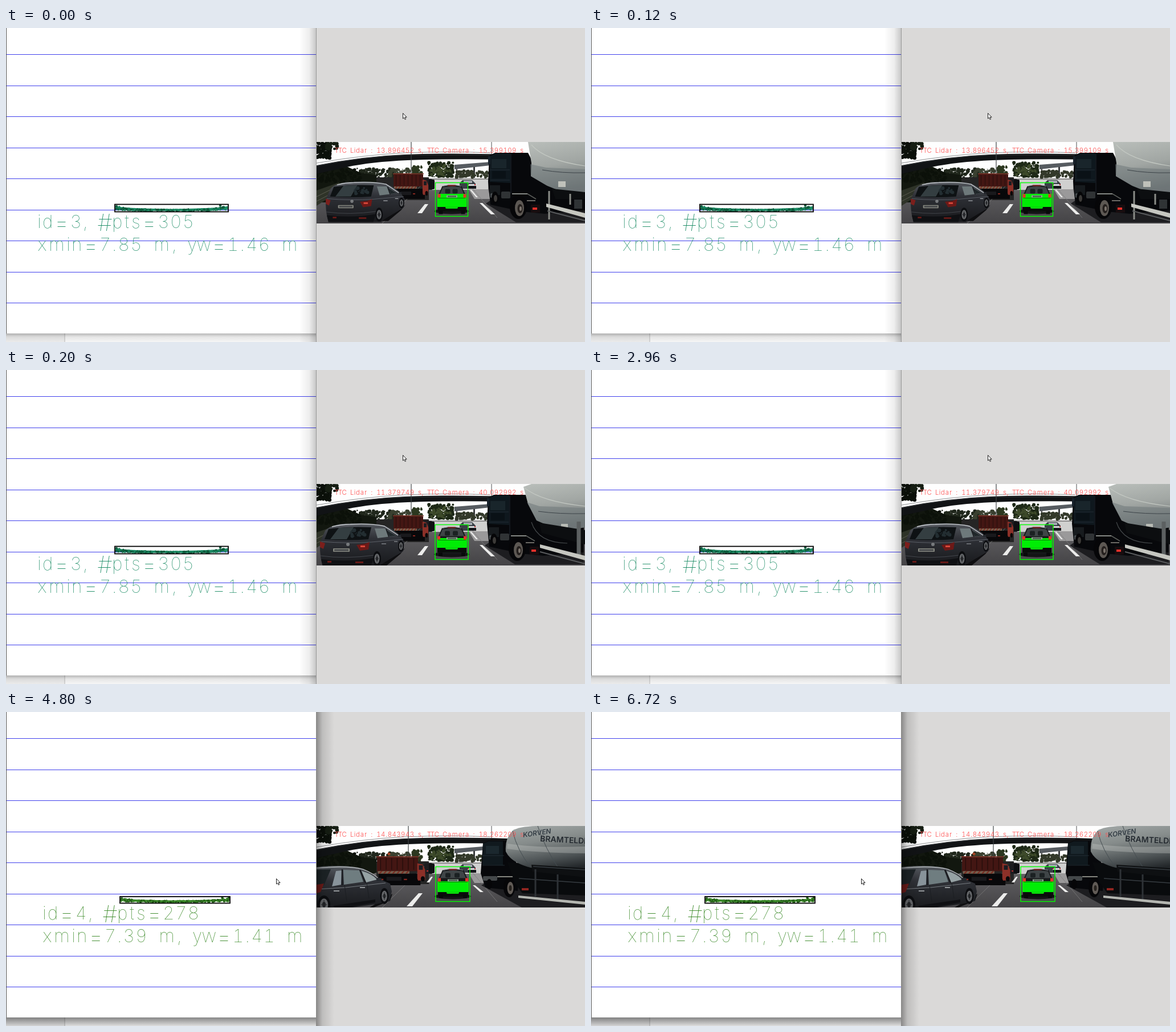
An HTML page that plays this animation: 1016 px wide and 551 px high, repeating every 8 s.

```html
<!DOCTYPE html>
<html lang="en">
<head>
<meta charset="utf-8">
<title>Time to collision</title>
<style>
html, body { margin: 0; width: 100%; height: 100%; overflow: hidden; background: #dad9d8; }
#stage { display: block; width: 1016px; height: 551px; }
text { font-family: Inter, Lato, "Open Sans", sans-serif; font-variant-numeric: tabular-nums; white-space: pre; }
.big text { font-weight: 100; }
.small text { font-weight: 300; }
.wide { font-size: 1.3em; }
.sign { font-weight: 600; }
.show { animation: 8s step-end infinite; }
#early { animation-name: early; }
#late { animation-name: late; }
#first { animation-name: first; }
#second { animation-name: second; }
@keyframes early { 0% { visibility: visible } 60%, 100% { visibility: hidden } }
@keyframes late { 0% { visibility: hidden } 60%, 100% { visibility: visible } }
@keyframes first { 0% { visibility: visible } 2.5%, 100% { visibility: hidden } }
@keyframes second { 0% { visibility: hidden } 2.5% { visibility: visible } 60%, 100% { visibility: hidden } }
</style>
</head>
<body>
<svg id="stage" viewBox="0 0 1016 551" xmlns="http://www.w3.org/2000/svg">
  <defs>
    <linearGradient id="sideIn" x1="1" x2="0"><stop offset="0" stop-opacity=".22"/><stop offset=".4" stop-opacity=".07"/><stop offset="1" stop-opacity="0"/></linearGradient>
    <linearGradient id="sideOut"><stop offset="0" stop-opacity=".38"/><stop offset=".35" stop-opacity=".13"/><stop offset="1" stop-opacity="0"/></linearGradient>
    <linearGradient id="under" x2="0" y2="1"><stop offset="0" stop-opacity=".25"/><stop offset=".4" stop-opacity=".07"/><stop offset="1" stop-opacity="0"/></linearGradient>
    <linearGradient id="underDark" x2="0" y2="1"><stop offset="0" stop-opacity=".45"/><stop offset="1" stop-opacity=".1"/></linearGradient>
    <linearGradient id="road" x2="0" y2="1"><stop offset="0" stop-color="#8b8a8a"/><stop offset=".3" stop-color="#5f5e60"/><stop offset="1" stop-color="#444346"/></linearGradient>
    <linearGradient id="paint" x2="0" y2="1"><stop offset="0" stop-color="#565a60"/><stop offset=".35" stop-color="#2f3137"/><stop offset="1" stop-color="#17181b"/></linearGradient>
    <linearGradient id="steel" x2=".25" y2="1"><stop offset="0" stop-color="#a4aaa9"/><stop offset=".4" stop-color="#858b8a"/><stop offset=".75" stop-color="#4e5456"/><stop offset="1" stop-color="#23272a"/></linearGradient>
    <linearGradient id="shell" x2=".2" y2="1"><stop offset="0" stop-color="#b9beba"/><stop offset=".5" stop-color="#a1a6a3"/><stop offset="1" stop-color="#6c7273"/></linearGradient>
  </defs>
  <g id="early" class="show"></g>
  <g id="late" class="show"></g>
</svg>
<script>
const box = (x, y, w, h, fill, more = '') => `<rect x="${x}" y="${y}" width="${w}" height="${h}" fill="${fill}" ${more}/>`;
const shape = (d, fill, more = '') => `<path d="${d}" fill="${fill}" ${more}/>`;
const line = (d, color, width = 1) => shape(d, 'none', `stroke="${color}" stroke-width="${width}"`);
const disc = (x, y, r, fill, ry = r) => `<ellipse cx="${x}" cy="${y}" rx="${r}" ry="${ry}" fill="${fill}"/>`;
const group = (inner, attrs) => `<g ${attrs}>${inner}</g>`;
const repeat = (n, fn) => Array.from({ length: n }, (_, i) => fn(i)).join('');

function seeded(seed) {
  return () => {
    seed = (seed * 1664525 + 1013904223) % 4294967296;
    return seed / 4294967296;
  };
}

// Plotter-style pitch: each glyph sits centred in a cell, in 21-per-cap-height units.
const cells = { '=': 26, '#': 21, '.': 10, ',': 10, ':': 10, ' ': 16, T: 16, C: 21, L: 17,
  a: 19, d: 19, e: 18, i: 8, m: 30, n: 19, p: 19, r: 13, s: 17, t: 12, w: 22, x: 17, y: 16 };

function label(str, x, y, scale, fill) {
  let pen = x;
  const xs = [], ys = [];
  for (const c of str) {
    const w = (cells[c] || 20) * scale;
    xs.push((pen + w / 2).toFixed(1));
    ys.push(y + ('=#'.includes(c) ? 4.5 * scale : 0));
    pen += w;
  }
  const marked = str.replace(/[=#]/g, '<tspan class="wide">$&</tspan>');
  return `<text x="${xs.join(' ')}" y="${ys.join(' ')}" font-size="${29 * scale}" text-anchor="middle" fill="${fill}">${marked}</text>`;
}

function leaves(x, y, w, h, n, fill, seed) {
  const rnd = seeded(seed);
  return repeat(n, () => disc((x + rnd() * w).toFixed(1), (y + rnd() * h).toFixed(1), (.8 + rnd() * 2.6).toFixed(1), fill));
}

function lidar(x, y, w, h, n, dark, light) {
  const rnd = seeded(n), r = x + w, base = y + h;
  const band = shape(`M${x + 1} ${y + 3}Q${x + 14} ${base - 6} ${x + w / 2} ${base - 5}Q${r - 14} ${base - 6} ${r - 1} ${y + 3}` +
    `V${base - 4}Q${x + w / 2} ${base + 1} ${x + 1} ${base - 4}Z`, light);
  const dots = repeat(n, () => {
    const u = rnd(), edge = Math.abs(2 * u - 1);
    const px = x + 2 + u * (w - 4);
    const py = base - 1 - 2 * edge * edge - rnd() * (3.5 + 5 * edge ** 8);
    return `<circle cx="${px.toFixed(1)}" cy="${py.toFixed(1)}" r="1.5" fill="${rnd() < .4 ? light : dark}"/>`;
  });
  return band + dots + disc(x + 3, y + 3, 2, dark) + disc(x + w * .93, y + 2, 2.2, dark) +
    box(x, y, w, h, 'none', 'stroke="#000" stroke-width="1.8"');
}

function topView(bounds, n, dark, light, ink, x, y, lines) {
  return box(0, 0, 544, 536, '#fff') +
    repeat(9, i => box(0, Math.round(46 + 54.5 * i), 544, 1, '#4040ec')) +
    lidar(...bounds, n, dark, light) +
    group(lines.map((s, i) => label(s, x, y + 40 * i, 1.09, ink)).join(''), 'class="big"') +
    box(0, 0, 1, 536, '#555');
}

const desk = shadow => box(0, 536, 544, 15, '#f6f6f6') + box(0, 536, 103, 15, '#ebebeb') +
  box(102, 536, 2, 15, '#d4d4d4') + box(0, 536, 544, 15, `url(#${shadow})`);

const cursor = (x, y) => shape(`M${x} ${y}v9.5l2.1-1.9 1.5 3.4 1.6-.7-1.5-3.3h2.9z`, '#fff', 'stroke="#222" stroke-width="1"');

function backdrop(pole) {
  return box(545, 200, 471, 143, '#fefefe') +
    box(545, 264, 471, 79, 'url(#road)') +
    leaves(620, 247, 60, 17, 120, '#20271c', 8) + leaves(672, 247, 36, 13, 60, '#3a4030', 5) +
    leaves(714, 242, 15, 20, 60, '#2c3820', 11) + leaves(741, 236, 44, 25, 170, '#1e2917', 4) +
    leaves(745, 240, 40, 20, 40, '#3d4a2a', 14) +
    shape('M545 250L598 243L622 254L650 258V282L572 306H545Z', '#12170f') +
    leaves(545, 246, 78, 24, 120, '#0c110a', 21) +
    shape('M545 285L585 271V286L545 312Z', '#2e3328') + line('M545 296L575 281M545 304L572 290', '#65655a', .8) +
    shape('M650 262H742V302H690L650 298Z', '#252525') +
    shape('M787 240L850 235V241L787 248Z', '#565b60') + box(790, 247, 2, 14, '#444') + box(820, 244, 3, 19, '#3a3c3e') +
    leaves(790, 251, 56, 11, 80, '#33392a', 19) +
    shape('M748 266H846V284H748Z', '#d0d0cf') + shape('M812 283H846L850 300H822Z', '#9a999a') +
    shape('M545 241Q625 225 700 222Q780 219 880 222V231Q780 229 705 232Q640 235 598 244L545 256Z', '#111315') +
    line('M545 237Q625 223 700 219Q780 216 850 219', '#707476', .8) + line('M545 242Q625 226 700 223L850 223', '#303437', 1) +
    leaves(545, 200, 24, 28, 130, '#0b100a', 2) + leaves(562, 201, 20, 12, 40, '#161e13', 6) +
    line(`M${pole} 200V255`, '#3f4346', 1.2) + line('M852 200V222', '#4c4e50', 1) +
    line('M735 270L660 343M812 274L862 333', '#7c7b7b', .8);
}

const distantCars = () => box(734, 265, 14, 19, '#1c1c1f', 'rx="2"') + box(742, 266, 10, 17, '#0e0f12', 'rx="2"') +
  box(738, 278, 3, 2, '#b43030') + shape('M796 282V272L801 267H818L824 273V282Z', '#3a4047') +
  box(803, 268, 15, 4, '#a6adb2') + box(810, 274, 15, 3, '#d8dadd') + box(811, 277, 14, 5, '#15161a') +
  box(810, 274, 2, 2, '#c03030') + box(822, 274, 2, 2, '#c03030');

const redTruck = () => box(682, 282, 53, 18, '#08080a') +
  shape('M680 255L732 257V278L680 279Z', '#431613') + box(679, 255, 54, 1.5, '#7a3227') +
  repeat(7, i => box(684 + 7 * i, 258, 1, 18, '#260e0c')) +
  box(681, 278, 40, 4, '#75604f') + repeat(7, i => shape(`M${682 + 5.6 * i} 282l3-4h2l-3 4z`, '#7a2a1f')) +
  shape('M731 266L738 268L741 276V292L731 293Z', '#8c3028') + box(733, 269, 5, 7, '#1c1d22') +
  box(684, 290, 4, 2, '#8a2820') + box(714, 290, 4, 2, '#8a2820') + box(692, 287, 19, 6, '#19191c') +
  disc(728, 294, 4, '#08080a', 6) + disc(738, 290, 2.5, '#08080a', 4);

const wheel = (x, y, r, ry) => disc(x, y, r, '#0c0d10', ry) + disc(x, y, r * .65, '#66686b', ry * .67) + disc(x, y, r * .28, '#222327', ry * .3) +
  line(`M${x - r * .5} ${y}h${r}M${x} ${y - ry * .5}v${ry}`, '#27282b', 1);

const greyCar = () => shape('M549 343L655 343L700 313L692 323L668 343Z', '#0e0e10') +
  shape('M551 302L560 282Q568 273 590 270Q640 267 664 273Q682 281 692 291L699 302L697 318L682 327L660 340L655 345H556Q550 326 551 302Z', 'url(#paint)') +
  shape('M566 279Q600 274 641 276L636 297Q600 300 559 297Z', '#0e1214') +
  shape('M584 277L610 276L598 297H569Z', '#343e41') + leaves(605, 280, 25, 13, 20, '#232e32', 9) +
  shape('M647 278L664 278L684 291L652 295Z', '#6e797b') + shape('M668 281L684 291L673 292Z', '#1f2629') + line('M667 279L672 293', '#1a1c20', 2) +
  line('M572 275Q588 271 604 271Q640 269 664 274L688 290', '#c8ccd0', 1.3) + line('M553 301Q600 305 641 302L697 297', '#5b5f66', 1) +
  shape('M551 301L560 304L557 314L551 311Z', '#7c1f1c') + shape('M638 302L629 305L615 307L621 317L636 315Z', '#6d1917') + box(622, 308, 8, 3, '#d9483a') +
  box(574, 313, 29, 6, '#85877f', 'rx="1"') + box(576, 314.5, 25, 3, '#45474a') + line('M552 326Q595 332 646 325', '#44474d') +
  shape('M553 332Q600 338 645 330L640 345H556Z', '#0f1013') + box(564, 335, 7, 3, '#661a17') + box(613, 336, 14, 3, '#661a17') +
  disc(600, 306, 3, '#777a7d') + box(688, 289, 5, 4, '#25282d', 'rx="1"') +
  line('M659 305H667M681 301H687', '#a6a9ad', 1.2) + wheel(651, 331, 7, 13) + wheel(693, 309, 5, 10);

const greyCarNear = () => shape('M545 343H638L678 319L674 331L645 343Z', '#0e0e10') +
  shape('M545 272Q598 267 627 275Q645 283 655 293L674 301L677 315L673 332L650 337L580 347H545Z', 'url(#paint)') +
  shape('M545 277L570 276L558 304L545 306Z', '#1d2427') +
  shape('M579 279L589 278L588 303L572 306Z', '#88939a') + shape('M592 277L620 278L627 298L593 303Z', '#6f7d80') +
  shape('M624 279Q643 284 651 294L632 299Z', '#96a2a4') + line('M590 276V304M621 277L631 300', '#1a1c20', 2.5) +
  line('M545 274Q600 269 626 276Q646 283 656 295', '#c3c7c9', 1.2) + line('M545 311L596 308L666 300', '#777c81', 1) +
  line('M594 304L598 333M633 300L637 327', '#1a1c20', .8) + line('M575 314H585M621 308H630', '#b7babd', 1.5) +
  box(650, 291, 9, 6, '#25292e', 'rx="2"') + shape('M545 303L558 301L552 316L545 318Z', '#701c19') +
  shape('M574 340L648 329V334L580 347Z', '#0f1013') + wheel(664, 323, 7.5, 14) + wheel(558, 338, 11, 16);

function target(x, y, w, h, fillY, fillH) {
  const mid = x + w / 2, r = x + w, foot = fillY + fillH;
  return disc(mid, y + h - 9, w / 2 + 2, '#131315', 5) +
    shape(`M${x + 4} ${y + 24}L${x + 12} ${y + 6}Q${mid} ${y + 2} ${r - 11} ${y + 6}L${r - 3} ${y + 24}V${y + 51}H${x + 4}Z`, '#17191b') +
    shape(`M${x + 13} ${y + 8}Q${mid} ${y + 5} ${r - 12} ${y + 8}L${r - 7} ${y + 20}H${x + 8}Z`, '#3f4547') +
    line(`M${x + 13} ${y + 6}Q${mid} ${y + 2} ${r - 12} ${y + 6}`, '#8a8f92', 1) +
    box(x + 17, y + 11, 9, 8, '#1b2122', 'rx="2"') + box(r - 27, y + 11, 9, 8, '#1b2122', 'rx="2"') +
    box(mid - 7, y + 4, 14, 2, '#7c2020') +
    box(x + 3, fillY, w - 5, fillH, '#00ed05', 'rx="1"') +
    box(x + 4, y + 20, 5, 6, '#e4322c') + box(r - 8, y + 20, 5, 6, '#e4322c') +
    box(mid - 9, y + 22, 19, 4, '#91a895') + box(mid - 7, y + 23, 15, 2, '#415445') +
    line(`M${x + 5} ${y + 27}H${r - 4}`, '#087e0b', 1) +
    box(x + 4, foot, w - 7, 8, '#0a0d0b') + box(mid - 11, foot - 1, 22, 4, '#08d90a', 'rx="2"') +
    box(x + 6, y + 49, 7, 6, '#08090a') + box(r - 12, y + 49, 7, 6, '#08090a') +
    box(x, y, w, h, 'none', 'stroke="#00ff00" stroke-width="1.4"');
}

const lorry = () => shape('M842 308L895 341H1016V282H880Z', '#1d1d20') +
  shape('M848 224L858 219H916L932 250L1016 262V320L945 326L905 322L850 310L846 270Z', '#07080b') +
  shape('M849 225L859 220H885V272L849 270Z', '#0f181e') + box(852, 230, 26, 16, '#19252b') +
  box(853, 251, 24, 13, '#0a1116') + line('M850 249H884M850 267H884M886 221V290', '#26323a', .8) +
  box(849, 276, 18, 17, '#171b1e') + box(850, 290, 12, 8, '#4b5053', 'rx="2"') + box(869, 287, 16, 12, '#303335', 'rx="2"') +
  box(846, 225, 4, 14, '#17212a') + line('M888 291H915', '#858884', 2) + line('M915 291L930 300', '#5b5d5a', 1.5) +
  disc(899, 314, 15, '#060608', 21) + disc(901, 316, 8, '#5d5853', 14) + disc(902, 317, 4.5, '#241f1d', 8) + disc(903, 317, 2, '#7a726b', 4) +
  disc(858, 298, 6, '#060608', 11) + disc(859, 299, 3, '#3c3a38', 6) +
  box(921, 310, 16, 14, '#180d0f') + box(924, 315, 8, 4, '#e4302a') + box(914, 302, 15, 2, '#6c6a65');

const tank = () => shape('M916 200H1016V292L975 287L950 277L921 260L922 237Z', 'url(#shell)') +
  shape('M920 239L948 245L1016 248V292L975 287L948 276L921 260Z', '#70787a', 'opacity=".55"') +
  line('M922 205Q945 232 1016 242', '#c3c8c2', 1.2) + line('M941 249Q975 255 1016 254', '#3c4348', 1) +
  box(969, 269, 13, 10, '#bfc1ba') + shape('M958 282L1016 288V300H964Z', '#0c0e10') +
  line('M953 286V336M990 291V310', '#8a8c87', 3) + shape('M948 308L1016 325V333L948 314Z', '#c6c7c1') +
  line('M950 321L1016 338', '#5a5c5e', 2) + box(997, 301, 14, 16, '#2f3335');

const tankLater = () => shape('M908 205L922 200H1016V276L994 280L956 275L931 264L916 235Z', 'url(#shell)') +
  shape('M914 232L936 239L1016 242V276L994 280L956 275L931 264Z', '#70787a', 'opacity=".55"') +
  line('M910 207Q940 231 1016 239', '#c3c8c2', 1.2) + line('M934 248Q970 253 1016 252', '#3c4348', 1) +
  box(974, 270, 12, 9, '#b8bbb5') + shape('M936 268L1016 281V306L940 286Z', '#0c0e10') +
  line('M922 267Q933 303 985 304', '#44484a', 1.2) + line('M1005 266V328', '#5c6061', 7) +
  shape('M937 306L1016 326V334L937 312Z', '#c6c7c1') + line('M937 319L1016 340', '#5a5c5e', 2);

const lorryNear = () => shape('M834 304L905 343H1016V283H870Z', '#1d1d20') +
  shape('M837 230L847 226H878L893 253L900 285L898 314L841 308L833 283Z', '#07080b') +
  shape('M837 231L847 227H872V269L836 268Z', '#10191e') + box(842, 235, 23, 14, '#1b282e') + line('M836 252H874M836 269H875', '#27333a', .8) +
  box(837, 288, 25, 8, '#44484a', 'rx="2"') + line('M862 289H892', '#85867f', 2) +
  disc(883, 308, 10, '#060608', 17) + disc(885, 309, 5.5, '#615b56', 11) + disc(885, 309, 2.5, '#28231f', 5) + disc(848, 302, 5, '#060608', 9) +
  shape('M880 264L1016 270V322L906 318L893 300Z', '#090b0d') +
  shape('M889 208Q900 201 930 200H1016V286L920 273Q886 264 877 245Q875 222 889 208Z', 'url(#steel)') +
  shape('M880 231Q930 239 1016 236V248Q930 247 879 240Z', '#c5c9c6', 'opacity=".35"') +
  line('M889 209Q897 243 921 273M933 200Q946 240 972 278', '#454d51', 1) +
  '<text class="sign" font-size="12" fill="#343d45" transform="translate(907 220) rotate(-8) skewX(-10)">KORVEN</text>' +
  '<text class="sign" font-size="14" fill="#242a30" transform="translate(937 227) rotate(3)">BRAMTELDE</text>' +
  shape('M922 268L1016 274V290L924 280Z', '#0e1012') + line('M925 271L1016 277M900 292L1016 300', '#363c41', 1.5) +
  line('M929 276V324M968 285V329', '#2e3236', 3) + shape('M899 322L1016 333V338L899 326Z', '#b4b6b1') + box(905, 309, 12, 4, '#8f2520');

function photo({ pole = 711, truckMove = '', cars, lorries, car, lidarTtc, cameraTtc }) {
  return '<svg x="545" y="200" width="471" height="143" viewBox="545 200 471 143">' + backdrop(pole) + distantCars() +
    group(redTruck(), `transform="${truckMove}"`) + cars + lorries + target(...car) +
    group(label(`TTC Lidar : ${lidarTtc} s, TTC Camera : ${cameraTtc} s`, 577, 219, .39, '#ff5050'), 'class="small"') + '</svg>';
}

const dash = d => shape(d, '#ececeb');
const lanes = dash('M722 325L735 309H741L730 325Z') + dash('M831 307L836 307L858 327H851Z') + dash('M814 284L817 284L828 297H825Z');
const lanesNear = dash('M703 341L724 318H731L713 341Z') + dash('M819 304L823 304L838 316H832Z') + dash('M738 299L746 289H749L743 299Z');
const rightWindow = box(544, 0, 472, 551, '#dad9d8');

const firstPhoto = photo({
  cars: lanes + group(greyCar(), 'transform="translate(46 18) scale(.935)"'),
  lorries: lorry() + tank(),
  car: [753.5, 271.5, 57, 59, 291, 23],
  lidarTtc: '13.896452', cameraTtc: '15.399109'
});
const secondPhoto = photo({
  cars: lanes + greyCar(),
  lorries: group(lorry(), 'transform="translate(-2 0)"') + tankLater(),
  car: [753, 271.5, 58, 61, 295, 17],
  lidarTtc: '11.379749', cameraTtc: '40.092992'
});
const latePhoto = photo({
  pole: 706,
  truckMove: 'translate(-290 -35) scale(1.384 1.13)',
  cars: lanesNear + greyCarNear() + disc(672, 249, 2.5, '#a74324'),
  lorries: lorryNear(),
  car: [754, 271.5, 60, 61, 297, 19],
  lidarTtc: '14.843943', cameraTtc: '18.262209'
});

document.getElementById('early').innerHTML = desk('under') +
  topView([191, 309.5, 199, 13], 305, '#0e5a3c', '#1c8a64', '#1d8d66', 54, 351, ['id=3, #pts=305', 'xmin=7.85 m, yw=1.46 m']) +
  box(514, 0, 30, 551, 'url(#sideIn)') + rightWindow + box(544, 0, 1, 551, '#999') +
  group(firstPhoto, 'id="first" class="show"') +
  group(secondPhoto, 'id="second" class="show"') +
  cursor(696.5, 149.5);

document.getElementById('late').innerHTML = desk('underDark') + rightWindow + latePhoto +
  box(544, 0, 32, 551, 'url(#sideOut)') +
  topView([200, 324, 193, 11.5], 278, '#245f18', '#3c8a2a', '#3b8a28', 63, 364, ['id=4, #pts=278', 'xmin=7.39 m, yw=1.41 m']) +
  cursor(474.5, 292.5);
</script>
</body>
</html>
```
